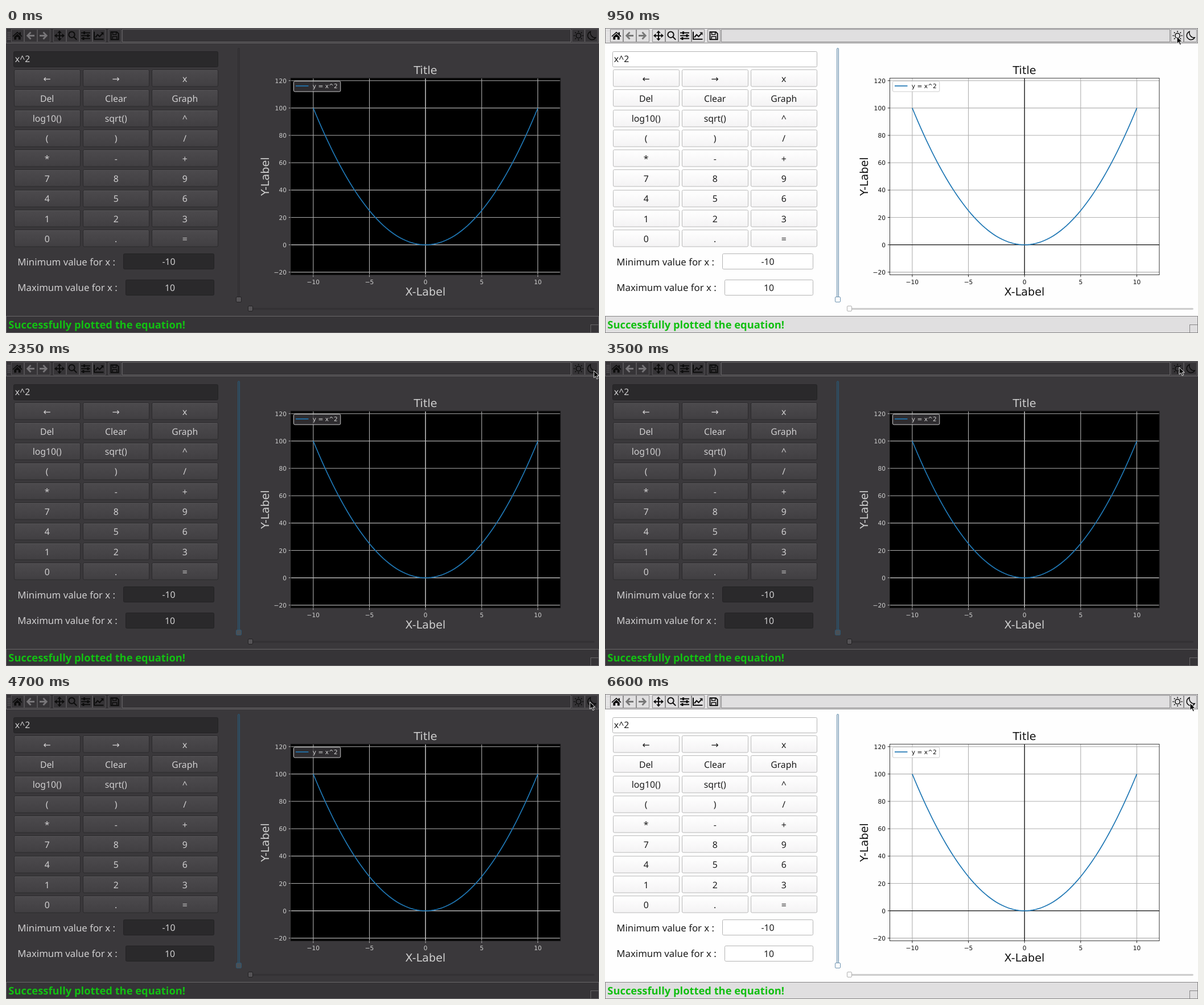
Write an HTML page that moves like this. It is 1042 px wide and 537 px high and loops after 7 s.

```html
<!DOCTYPE html>
<html lang="en">
<head>
<meta charset="utf-8">
<title>Graphing calculator</title>
<style>
html, body { margin: 0; width: 100%; height: 100%; overflow: hidden; }
svg { display: block; width: 1042px; height: 537px; }
.dark {
  --bg: #3a383b; --bar: #363437; --line: #696769; --edge: #545255; --text: #d0cfd0;
  --field: #2a292b; --fieldEdge: #232224; --btn1: #4c4a4d; --btn2: #413f42; --btnEdge: #2b2a2c; --shine: #565457;
  --icon: #0c0c0c; --dim: #777578; --dots: #767477;
  --groove: #363437; --grooveEdge: #312f32; --knob: #555356; --knobEdge: #232224;
  --focus: #2b5673; --focusFill: #33434e; --focusKnob: #4a5055;
  --face: #000; --grid: #b0b0b0; --axis: #bcbcbc; --spine: #111; --tick: #bbb; --plotText: #cfcfcf;
  --legend: #3a383b; --legendEdge: #cccccc; --ok: #12c112;
}
.light {
  --bg: #fefefe; --bar: #e0dfe0; --line: #858485; --edge: #8f8e8f; --text: #1c1c1c;
  --field: #fff; --fieldEdge: #b4b4b4; --btn1: #fff; --btn2: #f4f3f4; --btnEdge: #b9b9b9; --shine: #fff;
  --icon: #0c0c0c; --dim: #777; --dots: #f4f4f4;
  --groove: #d8d8d8; --grooveEdge: #c4c4c4; --knob: #fff; --knobEdge: #b0b0b0;
  --focus: #6d93b0; --focusFill: #d9e2e9; --focusKnob: #fff;
  --face: #fff; --grid: #b0b0b0; --axis: #161616; --spine: #222; --tick: #222; --plotText: #111;
  --legend: #fff; --legendEdge: #cccccc; --ok: #12bf12;
}
text { font: 15.8px "Noto Sans", "DejaVu Sans", sans-serif; fill: var(--text); text-rendering: geometricPrecision; }
text.label { font-size: 16.8px; }
text.status { font-size: 18.35px; font-weight: 700; fill: var(--ok); }
text.plot { font: 10.7px "DejaVu Sans", sans-serif; fill: var(--plotText); }
text.big { font-size: 19.2px; }
.mid { text-anchor: middle; }
.end { text-anchor: end; }
.bar { fill: var(--bar); stroke: var(--line); }
.cell { fill: none; stroke: var(--edge); }
.field { fill: var(--field); stroke: var(--fieldEdge); }
.btn { fill: url(#btn); stroke: var(--btnEdge); }
.shine { stroke: var(--shine); }
.groove { fill: var(--groove); stroke: var(--grooveEdge); }
.knob { fill: var(--knob); stroke: var(--knobEdge); }
.focus .v.groove { fill: var(--focusFill); stroke: var(--focus); }
.focus .v.knob { fill: var(--focusKnob); stroke: var(--focus); }
.fill { fill: var(--icon); }
.ink { fill: none; stroke: var(--icon); stroke-width: 2; }
.thin { stroke-width: 1.5; }
.dim { fill: none; stroke: var(--dim); stroke-width: 2.8; }
.grid { stroke: var(--grid); stroke-width: 1.1; }
.axis { stroke: var(--axis); stroke-width: 1.3; }
.tick { stroke: var(--tick); stroke-width: 1; }
.curve { fill: none; stroke: #1f77b4; stroke-width: 1.7; }
</style>
</head>
<body>
<svg id="app" class="dark" viewBox="0 0 1042 537">
  <defs>
    <linearGradient id="btn" x2="0" y2="1">
      <stop offset="0" style="stop-color:var(--btn1)"/>
      <stop offset="1" style="stop-color:var(--btn2)"/>
    </linearGradient>
  </defs>
  <g id="scene"></g>
  <path id="cursor" d="M0 0V12.5L3 9.8L5.2 14.8L7.4 13.8L5.2 9.1H9.2Z" fill="#080808" stroke="#fff" stroke-width=".9"/>
</svg>
<script>
const LOOP = 7000, STEP = 50;
const app = document.getElementById('app');
const cursor = document.getElementById('cursor');

const rect = (cls, x, y, w, h, r = 0) =>
  `<rect class="${cls}" x="${x + .5}" y="${y + .5}" width="${w}" height="${h}" rx="${r}"/>`;
const line = (cls, x1, y1, x2, y2) =>
  `<line class="${cls}" x1="${x1}" y1="${y1}" x2="${x2}" y2="${y2}"/>`;
const text = (cls, x, y, s, more = '') => `<text class="${cls}" x="${x}" y="${y}" ${more}>${s}</text>`;
const path = (cls, d) => `<path class="${cls}" d="${d}"/>`;
const icon = (x, body) => `<g transform="translate(${x} 13.5)">${body}</g>`;
const turn = (a, body) => `<g transform="rotate(${a})">${body}</g>`;

function toolbar() {
  let out = rect('bar', 0, 0, 1041, 26);
  for (let y = 7; y < 21; y += 3)
    for (const x of [3, 6]) out += `<rect x="${x}" y="${y}" width="1.4" height="1.4" fill="var(--dots)"/>`;
  for (const x of [9, 32, 55, 83, 106, 129, 152, 180, 994, 1017]) out += rect('cell', x, 2, 22, 22);
  out += rect('bar', 204, 2, 788, 22);

  out += icon(20, path('fill', 'M-8.5 .8L0 -7L3.5 -3.8V-6H6V-1.5L8.5 .8L7.4 2L0 -4.7L-7.4 2Z' +
    'M-5.7 2L0 -3.2L5.7 2V7H1.8V2.5H-1.8V7H-5.7Z'));
  const arrow = path('dim', 'M7 0H-5M.5 -6L-5.3 0L.5 6');
  out += icon(43, arrow) + icon(66, turn(180, arrow));

  const head = path('fill', 'M0 -9L3.8 -4.7H-3.8Z');
  out += icon(94, path('ink', 'M-6 0H6M0 -6V6') + [0, 90, 180, 270].map(a => turn(a, head)).join(''));
  out += icon(117, '<circle class="ink" cx="-1.5" cy="-1.8" r="5.2"/>' + path('ink', 'M2.2 2L7.3 7.1'));
  out += icon(140, path('ink', 'M-8 -5H8M-8 0H8M-8 5H8') +
    path('fill', 'M-4 -7.5H-1V-2.5H-4ZM2.5 -2.5H5.5V2.5H2.5ZM-5.5 2.5H-2.5V7.5H-5.5Z'));
  out += icon(163, path('ink', 'M-8 -7V6.3H8.5M-6 3L-2 -1.7L1.5 1.5L6.8 -4') +
    path('fill', 'M3.2 -6H8.5V-.7Z'));
  out += icon(191, path('ink', 'M-6.5 -6.5H3.8L6.7 -3.6V6.7H-6.5Z') +
    path('ink thin', 'M-3.5 -6V-2H2.7V-6M-3.7 6V1.5H3.7V6'));

  let rays = '';
  for (let a = 0; a < 360; a += 45) rays += turn(a, line('ink thin', 0, -6.3, 0, -8.6));
  out += icon(1006, '<circle class="ink thin" r="4.2"/>' + rays);
  out += icon(1028.5, path('ink thin', 'M-1.5 -7.2A7.4 7.4 0 1 0 7.6 3.3A8.5 8.5 0 0 1 -1.5 -7.2Z'));
  return out;
}

function keypad() {
  const rows = ['← → x', 'Del Clear Graph', 'log10() sqrt() ^', '( ) /', '* - +', '7 8 9', '4 5 6', '1 2 3', '0 . ='];
  let out = rect('field', 13, 41, 359, 27, 2) + text('', 15.8, 60.3, 'x^2');
  rows.forEach((row, r) => row.split(' ').forEach((key, c) => {
    const x = 14 + Math.round(c * 121.2), top = 73 + r * 35.28, y = Math.round(top);
    out += rect('btn', x, y, 116, 29.5, 2) + line('shine', x + 2, y + 1.5, x + 115, y + 1.5) +
      text('mid', x + 58.2, top + 21.6, key);
  }));
  out += text('label', 20.3, 417.6, 'Minimum value for x :') + rect('field', 206, 397, 159, 27, 2) +
    text('mid', 286, 417, '-10');
  out += text('label', 20.3, 463.3, 'Maximum value for x :') + rect('field', 210, 443, 155, 27, 2) +
    text('mid', 288, 463, '10');
  return out;
}

function sliders() {
  return rect('v groove', 407, 35, 3, 442, 1.5) + rect('v knob', 404, 473, 9, 9, 1.5) +
    rect('groove', 428, 493, 605, 2, 1) + rect('knob', 425, 489, 8, 9, 1.5);
}

function plot() {
  const px = x => 737.2 + x * 19.73, py = y => 381.7 - y * 2.408;
  const L = 500.5, R = 974, T = 88.3, B = 434.6;
  const frame = style => `<rect x="${L}" y="${T}" width="${R - L}" height="${B - T}" style="${style}"/>`;
  const minus = n => String(n).replace('-', '−');
  let out = frame('fill:var(--face)');
  for (let x = -10; x <= 10; x += 5)
    out += line('grid', px(x), T, px(x), B) + line('tick', px(x), B, px(x), B + 3.7) +
      text('plot mid', px(x), 450.8, minus(x));
  for (let y = -20; y <= 120; y += 20)
    out += line('grid', L, py(y), R, py(y)) + line('tick', L - 3.7, py(y), L, py(y)) +
      text('plot end', 493, py(y) + 4, minus(y));
  out += line('axis', px(0), T, px(0), B) + line('axis', L, py(0), R, py(0));
  let d = '';
  for (let x = -10; x <= 10; x += .25) d += `${d ? 'L' : 'M'}${px(x)} ${py(x * x)}`;
  out += path('curve', d) + frame('fill:none;stroke:var(--spine);stroke-width:.9');
  out += '<rect x="505.5" y="93.7" width="82.3" height="18.3" rx="2" fill="var(--legend)" fill-opacity=".8" stroke="var(--legendEdge)"/>' +
    line('curve', 509, 102, 531.5, 102) + text('plot', 538.7, 105.7, 'y = x^2');
  out += text('plot big mid', 737, 81, 'Title') + text('plot big mid', 737, 471.4, 'X-Label') +
    text('plot big mid', 0, 0, 'Y-Label', 'transform="translate(461.6 261.5) rotate(-90)"');
  return out;
}

document.getElementById('scene').innerHTML =
  '<rect width="1042" height="537" fill="var(--bg)"/>' + toolbar() + keypad() + sliders() + plot() +
  rect('bar', 0, 507, 1041, 29) + rect('bar', 1027, 522, 14, 14) +
  text('status', 4.3, 529, 'Successfully plotted the equation!');

// Times at which the theme flips, starting from dark.
const flips = [950, 2350, 3550, 4700, 5900];
const focusAt = 850, enterAt = 200;

// Pointer tip: time, x, y.
const moves = [
  [200, 1028, 516], [900, 1005, 15], [1200, 1005, 15], [1900, 1031, 18], [2000, 1033, 17],
  [2850, 1033, 17], [3450, 1009, 11], [3900, 1009, 11], [4300, 1026, 14],
  [4850, 1026, 14], [5400, 1014, 12], [5550, 1011, 12], [6200, 1011, 12], [6600, 1028, 16], [LOOP, 1028, 16]
];

function pointer(t) {
  const i = Math.max(1, moves.findIndex(m => m[0] >= t));
  const [a, b] = [moves[i - 1], moves[i]];
  const k = Math.max(0, (t - a[0]) / (b[0] - a[0]));
  const e = k * k * (3 - 2 * k);
  return [1, 2].map(n => a[n] + (b[n] - a[n]) * e);
}

function draw(now) {
  const t = Math.floor((now % LOOP) / STEP) * STEP;
  const theme = flips.filter(f => t >= f).length % 2 ? 'light' : 'dark';
  app.setAttribute('class', theme + (t >= focusAt ? ' focus' : ''));
  cursor.setAttribute('visibility', t >= enterAt ? 'visible' : 'hidden');
  cursor.setAttribute('transform', `translate(${pointer(t).join(' ')})`);
}

const start = performance.now();
function tick() {
  draw(performance.now() - start);
  requestAnimationFrame(tick);
}
tick();
</script>
</body>
</html>
```
